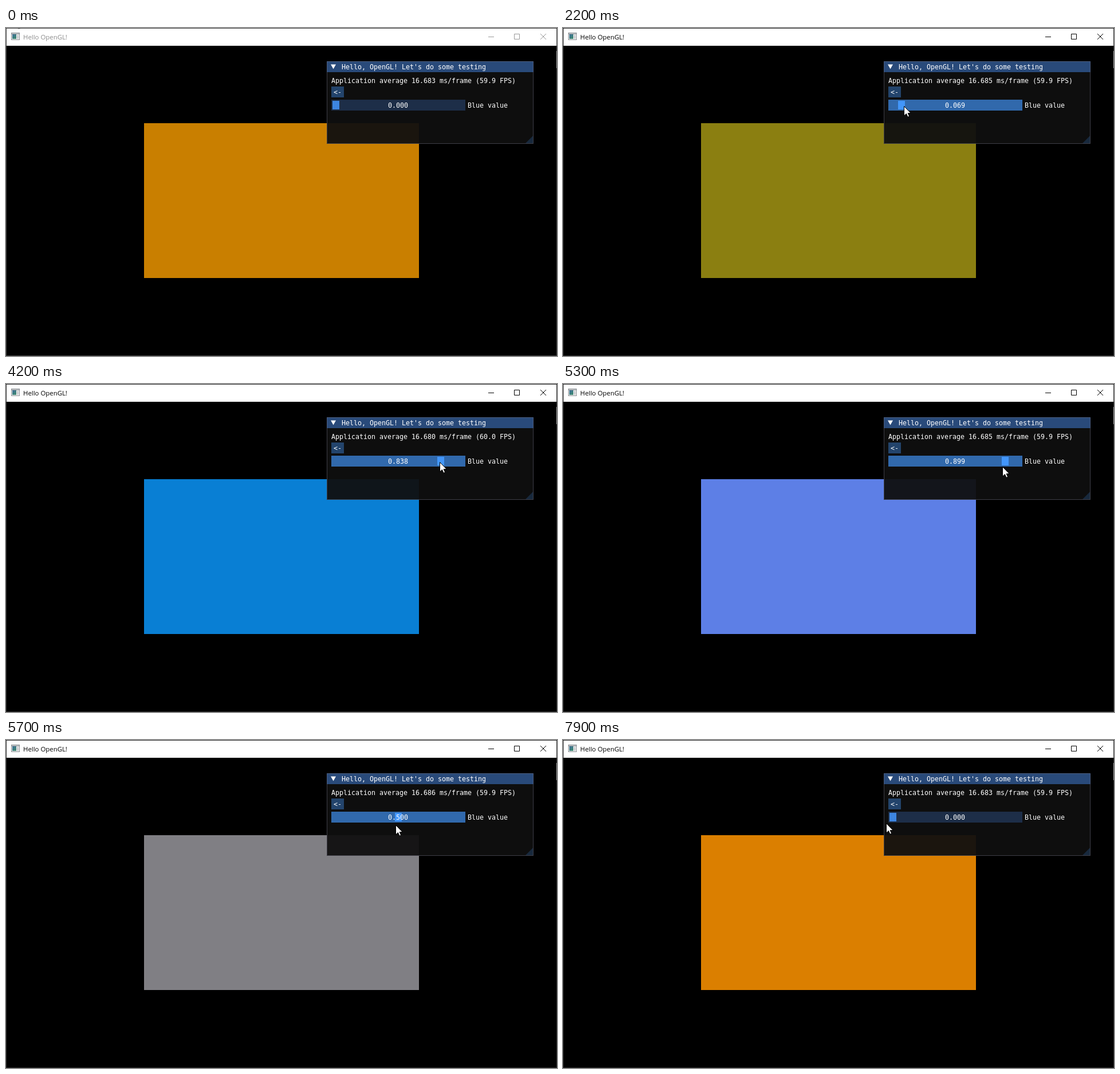
These frames come from a looping animation (962 by 572 pixels, 8 s). An HTML page with a canvas:

```html
<!DOCTYPE html>
<html lang="en">
<head>
<meta charset="utf-8">
<title>Hello OpenGL!</title>
<style>
  html, body { margin: 0; width: 100%; height: 100%; overflow: hidden; background: #000; }
  canvas { display: block; }
</style>
</head>
<body>
<canvas id="stage" width="962" height="572"></canvas>
<script>
const ctx = document.getElementById('stage').getContext('2d');
const LOOP = 8000, STEP = 100;
const ENTERED = 900, HOVER = 700, FOCUS = 1700, RELEASE = 6900;

// Mouse strokes along the slider. Red is signed: it falls to zero, then rises.
const strokes = [
  { start: 1600, end: 2200, value: .069, red: -139 },
  { start: 2300, end: 3200, value: .482, red: -55 },
  { start: 3500, end: 4500, value: .99, red: 37 },
  { start: 4700, end: 5300, value: .899, red: 93 },
  { start: 5300, end: 5700, value: .5, red: 128 },
  { start: 5800, end: 6400, value: .087, red: 177 },
  { start: 6400, end: 6700, value: -.03, red: 219 }
];

const clamp = (x, low = 0, high = 1) => Math.min(high, Math.max(low, x));
const ramp = (t, start, end) => clamp((t - start) / (end - start));
const mix = (a, b, k) => a + (b - a) * k;

function dragState(t) {
  let value = 0, red = -201;
  for (const stroke of strokes) {
    const k = ramp(t, stroke.start, stroke.end);
    value = mix(value, stroke.value, k);
    red = mix(red, stroke.red, k);
  }
  return { value, red };
}

// The pointer sweeps in from the top left, then follows the slider grab.
function cursorAt(t, value) {
  const arrival = 1 - (1 - ramp(t, 0, ENTERED)) ** 2;
  const offset = mix(4, -5, ramp(t, 2200, 5300));
  const x = 576 + value * 218 + offset;
  const y = 136 + 12 * ramp(t, 4500, 5700) - 3 * ramp(t, 6400, 6700);
  return [mix(15, x, arrival), mix(-18, y, arrival)];
}

const frameTime = t => 16.6825 + .0032 * Math.cos((t - 5550) / 3100 * 2 * Math.PI);

function rect(x, y, w, h, color) {
  ctx.fillStyle = color;
  ctx.fillRect(x, y, w, h);
}

function shape(path, color) {
  ctx.fillStyle = color;
  ctx.fill(new Path2D(path));
}

function line(path, color) {
  ctx.strokeStyle = color;
  ctx.lineWidth = 1;
  ctx.stroke(new Path2D(path));
}

function label(text, x, y, color = '#fff', font = '11.63px "DejaVu Sans Mono", monospace') {
  ctx.font = font;
  ctx.fillStyle = color;
  ctx.fillText(text, x, y);
}

function drawTitleBar(focused) {
  const ink = focused ? '#000' : '#999';
  rect(1, 1, 960, 30, '#fff');
  label('Hello OpenGL!', 30, 20, focused ? '#000' : '#8c8c8c', '11.4px "Open Sans", sans-serif');
  line('M842 15.5H852M887.5 10.5H896.5V19.5H887.5Z', ink);
  line('M933 10L943 20M943 10L933 20', ink);

  rect(9, 8, 15, 13, '#8a8f94');
  rect(10, 11, 13, 9, '#f4f4f4');
  rect(10, 9, 13, 1, '#d5d8da');
  const pane = ctx.createLinearGradient(11, 11, 17, 19);
  pane.addColorStop(0, '#3f6f9c');
  pane.addColorStop(1, '#3d8a6c');
  rect(11, 11, 7, 8, pane);
  rect(19, 12, 3, 7, '#c9cdd0');
}

function drawPanel(t, value) {
  const dragging = t >= FOCUS && t < RELEASE;
  const hovering = t >= HOVER && t < FOCUS;
  const ms = frameTime(t);

  rect(560, 58, 361, 144, 'rgba(15,15,15,.94)');
  rect(560, 58, 361, 19, '#294a7a');
  shape('M907 201L920 188V201Z', '#18293d');
  line('M560.5 58.5H920.5V201.5H560.5Z', 'rgba(110,110,128,.5)');
  shape('M567 63.6H576L571.5 71.6Z', '#fff');
  label("Hello, OpenGL! Let's do some testing", 586, 72);
  label(`Application average ${ms.toFixed(3)} ms/frame (${(1000 / ms).toFixed(1)} FPS)`, 568, 96);

  rect(568, 102, 22, 19, '#23446c');
  label('<-', 572, 116);

  rect(568, 125, 234, 19, dragging ? '#3169ac' : hovering ? '#23446c' : '#1d2e48');
  rect(570 + Math.round(value * 218), 127, 12, 15, dragging ? '#4296fa' : '#3d85e0');
  label(value.toFixed(3), 667, 139);
  label('Blue value', 806, 139);
}

function drawCursor(x, y) {
  ctx.save();
  ctx.translate(Math.round(x), Math.round(y));
  const arrow = 'M.5 .5V17L4.4 13.4L7 19.2L9.6 18.1L7.2 12.5H12.2Z';
  shape(arrow, '#fff');
  line(arrow, '#000');
  ctx.restore();
}

function draw(t) {
  const focused = t >= FOCUS;
  const { value, red } = dragState(t);
  // The rectangle is drawn one render tick behind the slider.
  const blue = clamp(dragState(t - 16).value) * 255;

  rect(0, 0, 962, 572, '#000');
  drawTitleBar(focused);
  rect(241, 166, 480, 270, `rgb(${Math.round(Math.abs(red))},127,${Math.round(blue)})`);
  drawPanel(t, clamp(value));
  line('M.5 .5H961.5V571.5H.5Z', focused ? '#2b2b2b' : '#404040');
  rect(961, 40, 1, 30, '#aaa');
  drawCursor(...cursorAt(t, value));
}

const start = performance.now();
function tick() {
  const elapsed = (performance.now() - start) % LOOP;
  draw(Math.floor(elapsed / STEP) * STEP);
  requestAnimationFrame(tick);
}
tick();
</script>
</body>
</html>
```
